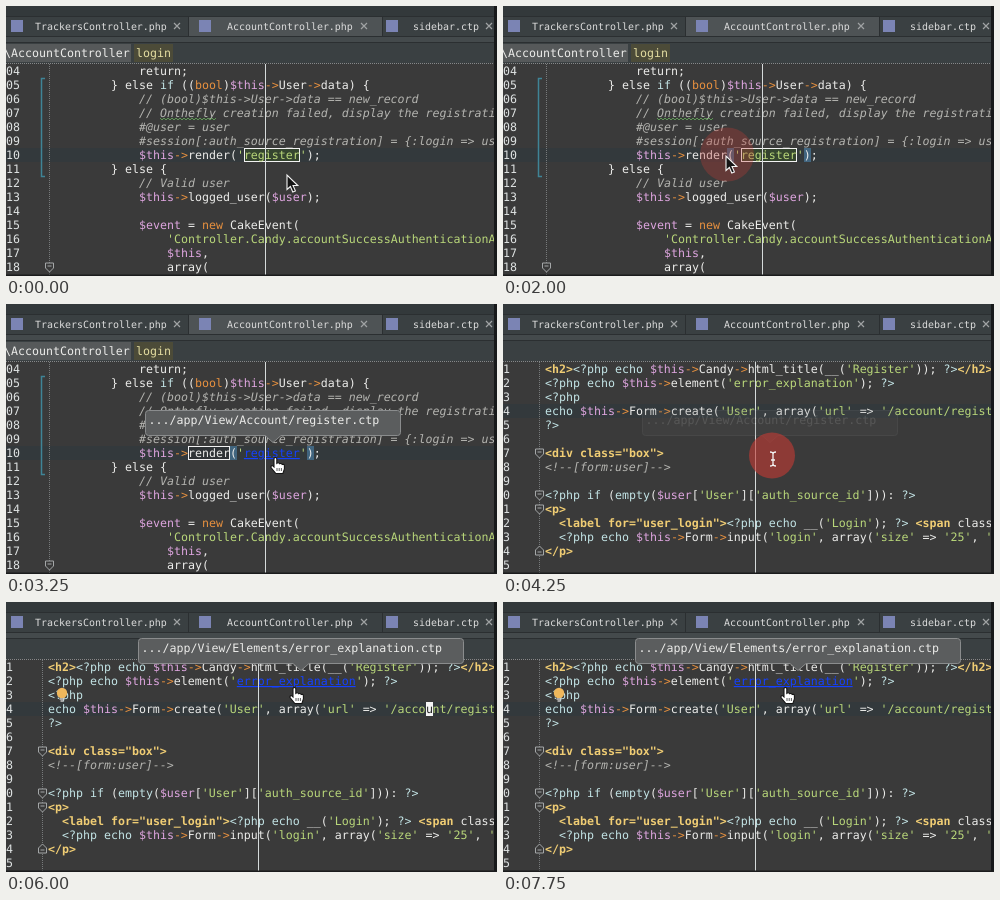
An HTML page that plays this animation: 491x270 px, repeating every 8 s.

```html
<!DOCTYPE html>
<html lang="en">
<head>
<meta charset="utf-8">
<title>Jump to view from editor</title>
<style>
html, body { margin: 0; width: 100%; height: 100%; overflow: hidden; background: #3a3a3a; }
svg { display: block; width: 491px; height: 270px; }
text { font: 11.627px "DejaVu Sans Mono", monospace; white-space: pre; text-rendering: geometricPrecision; fill: #ececea; }
.tab { font-size: 9.966px; fill: #dcdcdc; }
.num { fill: #dfe3e3; }
.com { font-style: italic; fill: #b4b4b0; }
.str { fill: #b9d77a; }
.var { fill: #dfa6e0; }
.key { fill: #e8913f; }
.php { fill: #c3e4e6; }
.tag { fill: #f0cd74; font-weight: bold; }
.link.on { fill: #1440ff; text-decoration: underline; }
</style>
</head>
<body>
<svg id="stage" viewBox="0 0 491 270">
  <rect width="491" height="270" fill="#3a3a3a"/>
  <g id="pages"></g>
  <g id="tabs">
    <rect width="491" height="57" fill="#3a4042"/>
    <rect width="491" height="10" fill="#33393b"/>
    <rect id="active" x="183" y="10" width="193" height="21" fill="#4e5355"/>
    <rect y="30.5" width="491" height="5.5" fill="#444a4c"/>
    <path d="M0 10.5H491M0 30.5H491M0 36.5H491M182.5 10V30M376.5 10V30" stroke="#2b2f31" fill="none"/>
  </g>
  <g id="crumbs">
    <rect y="38" width="125" height="18" fill="#56595a"/>
    <rect x="128" y="38" width="39" height="18" fill="#4c4b38"/>
    <text x="-2" y="51">\AccountController</text>
    <text x="130" y="51" style="fill:#e3dca0">login</text>
  </g>
  <path d="M0 57.5H488" stroke="#84888a" stroke-dasharray="1 1"/>
  <g id="tip">
    <path id="tipBox" fill="#5b5d5e" stroke="#8a8c8d"/>
    <text id="tipText"></text>
  </g>
  <g id="bulb">
    <circle cx="56" cy="91" r="5.2" fill="#efb75c"/>
    <path d="M53.5 97H58.5M54.5 99H57.5" stroke="#c9c9c9" stroke-width="1.4"/>
  </g>
  <circle id="press" fill="#c03a34"/>
  <g id="cursor">
    <path id="arrow" d="M0 0V14.5L3.4 11.5L5.8 17L8.4 15.9L6 10.5H10.8Z" fill="#151515" stroke="#f4f4f4" stroke-width="1.1"/>
    <g id="hand">
      <path d="M0 1.5Q1.3 -.8 2.8 1.5V6.4Q4.4 5 5.6 6.8Q7.2 5.8 8.2 7.5Q10.4 6.8 10.4 9V12L8.9 16.5H1.8L-3 10.6Q-3.4 8.4 -1.4 8.7L0 10Z" fill="#fff" stroke="#151515" stroke-width="1.1"/>
      <path d="M3 11V14M5.2 11V14M7.4 11V14" stroke="#333" stroke-width=".8"/>
    </g>
    <path id="beam" d="M-1 -5Q2 -5 2 -3Q2 -5 5 -5M2 -3V7M-1 9Q2 9 2 7Q2 9 5 9M0 3H4" fill="none" stroke="#f2f2f2" stroke-width="1.3"/>
  </g>
  <rect x="488" width="3" height="270" fill="#17191a"/>
  <rect y="268.5" width="491" height="1.5" fill="#1b1c1d"/>
</svg>
<script>
const LOOP = 8000, STEP = 250, CH = 7, ROW = 14;
const $ = id => document.getElementById(id);

function add(parent, tag, attrs, text) {
  const el = document.createElementNS('http://www.w3.org/2000/svg', tag);
  for (const k in attrs) el.setAttribute(k, attrs[k]);
  if (text !== undefined) el.textContent = text;
  parent.appendChild(el);
  return el;
}
const set = (el, attrs) => { for (const k in attrs) el.setAttribute(k, attrs[k]); };
const show = (el, on) => set(el, { visibility: on ? 'visible' : 'hidden' });

// ~word~ marks the clickable view name
const TOKEN = /~\w+~|'[^'~]*'|"[^"]*"|'|\$\w+|->|=>|<\?php|\?>|<\/?\w+|\b(?:class|for)=|>|[^~'"$<>?=\-\w]+|\w+|./g;

function kind(s) {
  if (s[0] === '~') return 'str link';
  if (s[0] === "'") return 'str';
  if (s[0] === '$') return 'var';
  if (/^(->|new|bool)$/.test(s)) return 'key';
  if (/^(<\?php|\?>|echo|if|empty)$/.test(s)) return 'php';
  if (/^(<\/?\w|class=|for=|>|")/.test(s)) return 'tag';
  return '';
}

function codeLine(parent, src, x, y) {
  const body = src.trimStart();
  const line = add(parent, 'text', { x: x + (src.length - body.length) * CH, y });
  if (/^(\/\/|#|<!--)/.test(body)) {
    line.setAttribute('class', 'com');
    line.textContent = body;
    return;
  }
  for (const s of body.match(TOKEN) || [])
    add(line, 'tspan', { class: kind(s) }, s.replace(/~/g, ''));
}

const rowY = row => 58 + row * ROW;

function page(o) {
  const g = add($('pages'), 'g', {});
  add(g, 'rect', { y: rowY(o.current), width: 488, height: ROW, fill: '#33393c' });
  add(g, 'path', { d: `M${o.x - 5.5} 58V270`, stroke: '#777a7b', 'stroke-dasharray': '1 1' });
  const marks = add(g, 'g', {});
  o.lines.forEach((src, i) => {
    const y = rowY(i) + 11, n = String(o.first + i).padStart(2, '0');
    add(g, 'text', { x: 0, y, class: 'num' }, n.slice(-o.digits));
    codeLine(g, src, o.x, y);
  });
  for (const [row, up] of o.folds)
    add(g, 'path', {
      d: 'M-4 -4H4V1L0 5L-4 1ZM-2 -1H2', fill: '#3a3a3a', stroke: '#a4a7a8',
      transform: `translate(${o.x - 5.5} ${rowY(row) + 7})${up ? ' scale(1 -1)' : ''}`
    });
  add(g, 'path', { d: `M${o.x + 30 * CH + .5} 58V270`, stroke: '#d5dada' });
  return { g, marks, link: g.querySelector('.link') };
}

const account = page({
  x: 49, first: 4, digits: 2, current: 6, folds: [[14]],
  lines: [
    '            return;',
    '        } else if ((bool)$this->User->data) {',
    '            // (bool)$this->User->data == new_record',
    '            // Onthefly creation failed, display the registration',
    '            #@user = user',
    '            #session[:auth_source_registration] = {:login => user',
    "            $this->render('~register~');",
    '        } else {',
    '            // Valid user',
    '            $this->logged_user($user);',
    '',
    '            $event = new CakeEvent(',
    "                'Controller.Candy.accountSuccessAuthenticationAfter'",
    '                $this,',
    '                array('
  ]
});

const view = page({
  x: 42, first: 1, digits: 1, current: 3, folds: [[6], [9], [10], [13, true]],
  lines: [
    "<h2><?php echo $this->Candy->html_title(__('Register')); ?></h2>",
    "<?php echo $this->element('~error_explanation~'); ?>",
    '<?php',
    "echo $this->Form->create('User', array('url' => '/account/register'",
    '?>',
    '',
    '<div class="box">',
    '<!--[form:user]-->',
    '',
    "<?php if (empty($user['User']['auth_source_id'])): ?>",
    '<p>',
    "  <label for=\"user_login\"><?php echo __('Login'); ?> <span class",
    "  <?php echo $this->Form->input('login', array('size' => '25', ''",
    '</p>',
    ''
  ]
});

// Change bracket, spelling wave and word highlights
add(account.g, 'path', { d: 'M39 72.5H35.5V170.5H39', fill: 'none', stroke: '#3f8496', 'stroke-width': 1.5 });
add(account.g, 'path', { d: 'M154 112' + 'l2 2l2 -2'.repeat(14), fill: 'none', stroke: '#5e9a55' });
const parens = add(account.marks, 'path', { d: 'M224 142h7v14h-7zM301 142h7v14h-7z', fill: '#41657f' });
const wordBox = add(account.marks, 'rect', { y: 142.5, height: 13, stroke: '#f2f2f2' });

const caret = add(view.g, 'g', {});
add(caret, 'rect', { x: 420, y: 100, width: 7, height: 14, fill: '#f4f4f4' });
add(caret, 'text', { x: 420, y: 111, style: 'fill:#222' }, 'u');

[['TrackersController.php', 5, 171], ['AccountController.php', 193, 358], ['sidebar.ctp', 380, 483]]
  .forEach(([name, x, close], i) => {
    add($('tabs'), 'rect', { x, y: 14, width: 12, height: 12, fill: '#7b84b4' });
    add($('tabs'), 'text', { x: [29, 221, 407][i], y: 23.5, class: 'tab' }, name);
    add($('tabs'), 'path', { d: `M${close - 3} 17l6 6m0 -6l-6 6`, stroke: '#a0a3a4', 'stroke-width': 1.2 });
  });

// time, x, y of the pointer
const PATH = [
  [0, 281, 169], [750, 287, 154], [1250, 286, 154], [1750, 223, 150], [2250, 223, 150],
  [2750, 262, 152], [3250, 268, 153], [4500, 268, 153], [5250, 287, 86],
  [6000, 287, 85], [7000, 285, 85], [7750, 281, 85], [8000, 281, 85]
];

function pointer(t) {
  const i = PATH.findIndex(p => p[0] > t);
  const [t0, x0, y0] = PATH[i - 1], [t1, x1, y1] = PATH[i];
  const u = (t - t0) / (t1 - t0), e = u * u * (3 - 2 * u);
  return [x0 + (x1 - x0) * e, y0 + (y1 - y0) * e];
}

function tooltip(text, x, y, alpha) {
  const w = text.length * CH + 24, m = x + w / 2, b = y + 25;
  $('tipText').textContent = text;
  set($('tipText'), { x: x + 3, y: y + 13.5 });
  set($('tipBox'), {
    d: `M${x + 3} ${y}H${x + w - 3}q3 0 3 3V${b - 3}q0 3 -3 3H${m + 8}L${m} ${b + 7}L${m - 8} ${b}H${x + 3}q-3 0 -3 -3V${y + 3}q0 -3 3 -3Z`
  });
  set($('tip'), { opacity: alpha });
}

// Click ring: full while held, wider and fainter on release
function press(t, x, y) {
  const ring = (from, up) => t < from || t >= up + STEP ? 0 : t < up ? 1 : .5;
  const a = ring(1750, 2000) || ring(4000, 4500);
  set($('press'), { cx: x + 1, cy: y - 1.5, r: a < 1 ? 27 : 23, opacity: a * .62 });
}

function draw(t) {
  const inView = t >= 4250;
  show(account.g, !inView);
  show(view.g, inView);
  show($('crumbs'), !inView);
  show($('active'), !inView);

  const moved = t >= 2250, linked = t >= 2750 && !inView;
  set(parens, { opacity: t >= 1750 ? 1 : 0 });
  set(wordBox, moved
    ? { x: 182.5, width: 41, fill: '#2f3336' }
    : { x: 238.5, width: 55, fill: '#35452f' });
  account.link.classList.toggle('on', linked);
  view.link.classList.toggle('on', t >= 5250);
  set(caret, { opacity: t >= 5000 && t % 1000 < 500 ? 1 : 0 });
  show($('bulb'), t >= 5250);

  if (t < 5000) tooltip('.../app/View/Account/register.ctp', 139.5, 106.5, t < 3000 || t >= 4500 ? 0 : inView ? .16 : 1);
  else tooltip('.../app/View/Elements/error_explanation.ctp', 132.5, 36.5, t >= 5500 ? 1 : 0);

  const [x, y] = pointer(t);
  press(t, x, y);
  set($('cursor'), { transform: `translate(${x} ${y})` });
  show($('arrow'), t < 2750);
  show($('hand'), linked || t >= 5250);
  show($('beam'), inView && t < 5250);
}

function tick() {
  const t = performance.now() % LOOP;
  draw(Math.floor(t / STEP) * STEP);
  requestAnimationFrame(tick);
}
tick();
</script>
</body>
</html>
```
